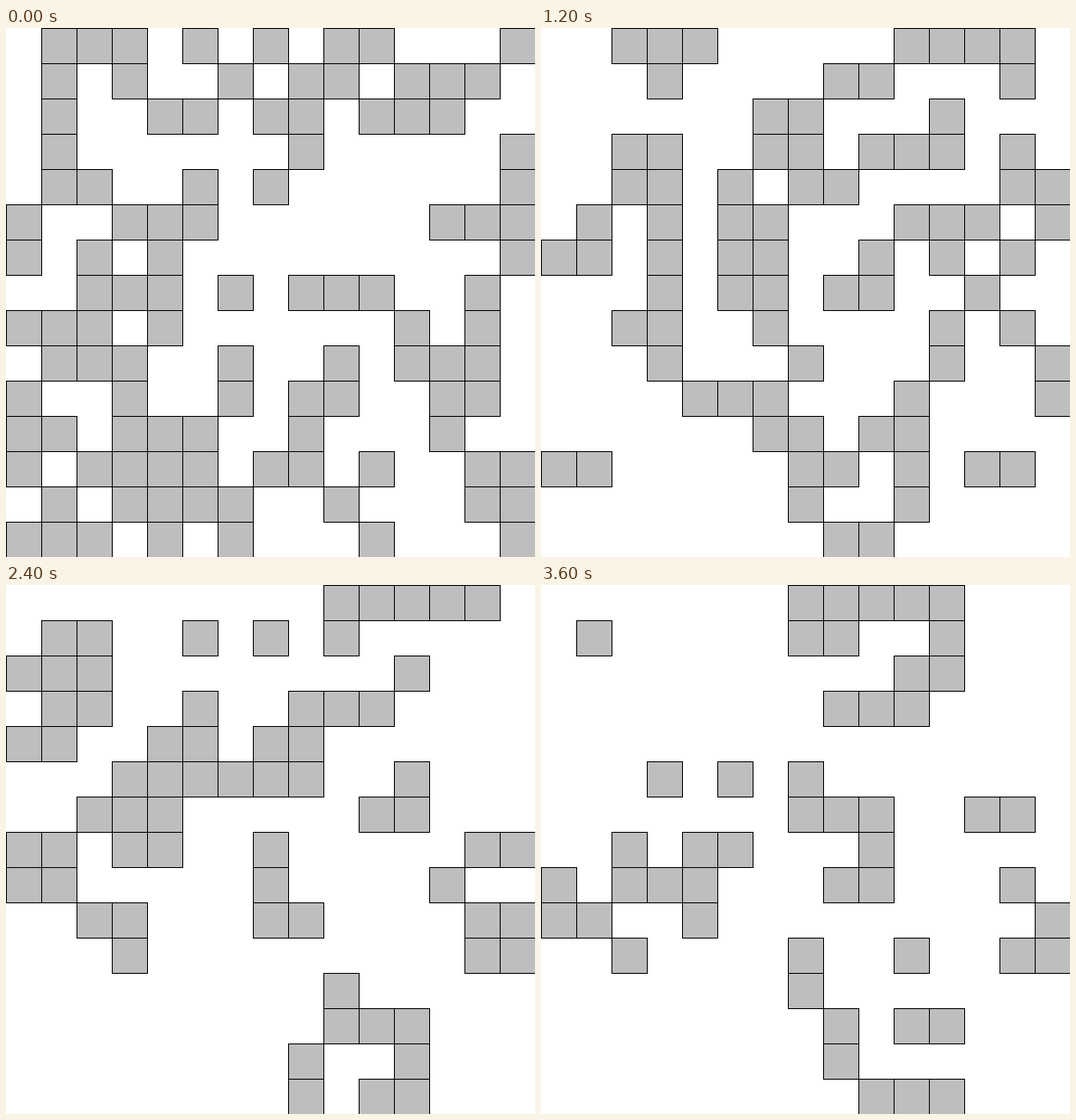
An HTML page with a canvas for the animation above (4 s loop, 600x600 px).

```html
<!DOCTYPE html>
<html lang="en">
<head>
<meta charset="utf-8">
<title>Game of Life</title>
<style>
  html, body { margin: 0; width: 100%; height: 100%; overflow: hidden; background: #fff; }
  canvas { display: block; }
</style>
</head>
<body>
<canvas id="stage" width="600" height="600"></canvas>
<script>
const CELL = 40, STEP = 400, GENERATIONS = 10;

const seed = [
  ".###.#.#.##...#",
  ".#.#..#.##.###.",
  ".#..##.##.###..",
  ".#......#.....#",
  ".##..#.#......#",
  "#..###......###",
  "#.#.#.........#",
  "..###.#.###..#.",
  "###.#......#.#.",
  ".###..#..#.###.",
  "#..#..#.##..##.",
  "##.###..#...#..",
  "#.####.##.#..##",
  ".#.####..#...##",
  "###.#.#...#...#"
].map(row => [...row].map(c => c === "#"));

// Cells beyond the edge count as dead.
function neighbours(grid, r, c) {
  let n = 0;
  for (let dr = -1; dr <= 1; dr++)
    for (let dc = -1; dc <= 1; dc++)
      if ((dr || dc) && grid[r + dr]?.[c + dc]) n++;
  return n;
}

function evolve(grid) {
  return grid.map((row, r) => row.map((alive, c) => {
    const n = neighbours(grid, r, c);
    return n === 3 || (alive && n === 2);
  }));
}

const history = [seed];
while (history.length < GENERATIONS) history.push(evolve(history.at(-1)));

const ctx = document.getElementById("stage").getContext("2d");

function draw(grid) {
  ctx.fillStyle = "#fff";
  ctx.fillRect(0, 0, 600, 600);
  grid.forEach((row, r) => row.forEach((alive, c) => {
    if (!alive) return;
    const x = c * CELL, y = r * CELL;
    ctx.fillStyle = "#000";
    ctx.fillRect(x, y, CELL + 1, CELL + 1);
    ctx.fillStyle = "#bebebe";
    ctx.fillRect(x + 1, y + 1, CELL - 1, CELL - 1);
  }));
}

const start = performance.now();
let shown = -1;

function tick() {
  const gen = Math.floor((performance.now() - start) / STEP) % GENERATIONS;
  if (gen !== shown) draw(history[shown = gen]);
  requestAnimationFrame(tick);
}
tick();
</script>
</body>
</html>
```
